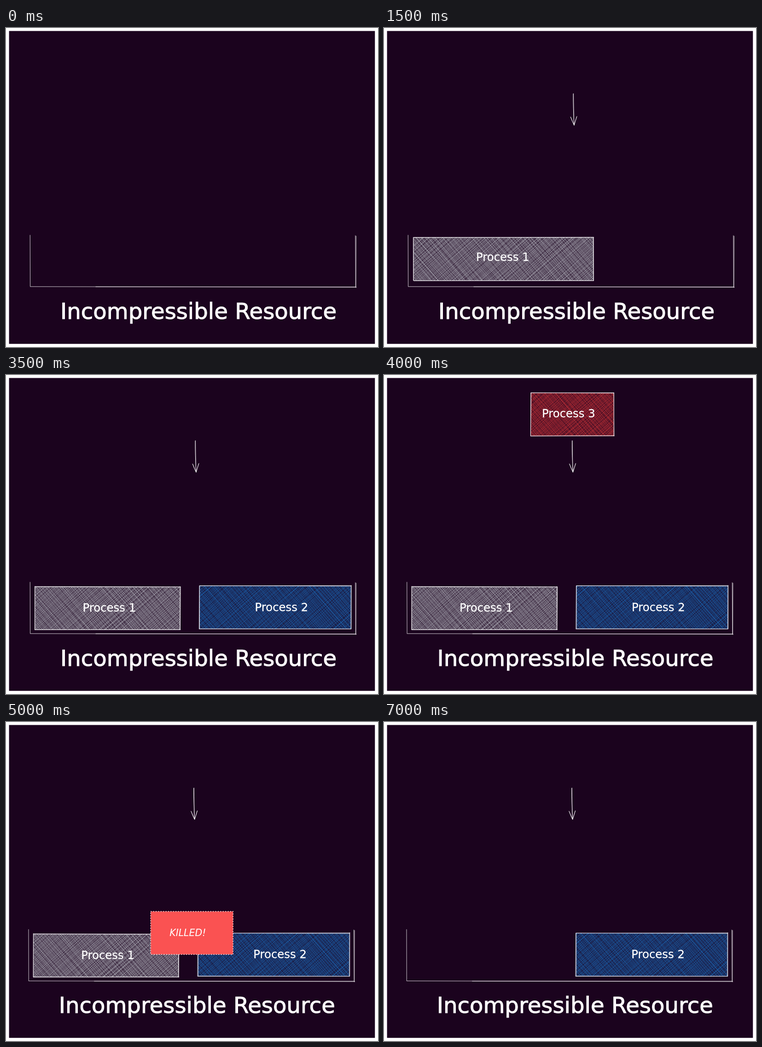
These frames come from a looping animation (808 by 693 pixels, 7.5 s). An HTML page:

```html
<!DOCTYPE html>
<html lang="en">
<head>
<meta charset="utf-8">
<title>Incompressible Resource</title>
<style>
  html, body { margin: 0; width: 100%; height: 100%; overflow: hidden; background: #fff; }
  svg { display: block; }
  text { font-family: "DejaVu Sans", sans-serif; font-size: 24.4px; fill: #fff; stroke: #fff; stroke-width: .3; }
  .title { font-size: 48.2px; stroke-width: 1; }
  .killed { font-size: 20.5px; font-style: italic; stroke: none; }
  .line { fill: none; stroke: #fff; stroke-width: 1; stroke-linecap: round; }
  .thin { stroke-width: .8; }
  .dotted { stroke-width: 1.4; stroke-dasharray: 2 3.4; stroke-linecap: butt; }
  .base { fill-opacity: .24; }
  .hatch { fill: none; stroke-width: .6; stroke-opacity: .62; }
</style>
</head>
<body>
<svg id="stage" width="808" height="693" viewBox="0 0 808 693">
  <rect x="6.6" y="6.5" width="794.7" height="679.7" fill="#1b031e"/>
  <g id="world">
    <path class="line thin" d="M52.3 450L52.6 561M52.6 561.8L761 563.2M195 562.2L760 562.4M758.8 451L759.4 562M760.4 452L760 564"/>
    <text class="title" x="118" y="631.5">Incompressible Resource</text>
    <path id="arrow" class="line thin" d="M411 143Q410.6 172 413 211M411.6 142.5Q412 180 412.6 210M405.4 193.5Q408.5 203 413 211M405.2 193Q410 203 412.6 210.5M419 192Q415.5 203 413 211M418.6 192.6Q416 201 412.8 211"/>
    <g id="scenes"></g>
  </g>
</svg>
<script>
const STEP = 500;
const NS = 'http://www.w3.org/2000/svg';
const world = document.getElementById('world');
const arrow = document.getElementById('arrow');
const GREY = '#ced4da', BLUE = '#1c7ed6', RED = '#f03e3e', ALERT = '#fa5252';

function add(parent, tag, attrs, text) {
  const node = document.createElementNS(NS, tag);
  for (const key in attrs) node.setAttribute(key, attrs[key]);
  if (text) node.textContent = text;
  return parent.appendChild(node);
}

function seeded(seed) {
  return () => {
    seed = (seed * 16807) % 2147483647;
    return seed / 2147483647 - 0.5;
  };
}

const segment = (...p) => {
  const [x1, y1, x2, y2] = p.map(v => v.toFixed(1));
  return `M${x1} ${y1}L${x2} ${y2}`;
};

// Two families of doubled, slightly uneven lines at right angles.
function crossHatch(w, h, random) {
  const angle = 41 * Math.PI / 180;
  const families = [
    { run: -h / Math.tan(angle), gap: 4 / Math.sin(angle) },
    { run: h * Math.tan(angle), gap: 4 / Math.cos(angle) }
  ];
  let d = '';
  for (const { run, gap } of families) {
    for (let x = -Math.abs(run); x < w + Math.abs(run); x += gap) {
      for (let pass = 0; pass < 2; pass++) {
        d += segment(x + random() * 7, 0, x + run + random() * 7, h);
      }
    }
  }
  return d;
}

function sketchRect(x, y, w, h, random) {
  const corners = [[x, y], [x + w, y], [x + w, y + h], [x, y + h]];
  const wobble = v => v + random() * 1.5;
  let d = '';
  for (let pass = 0; pass < 2; pass++) {
    corners.forEach((a, i) => {
      const b = corners[(i + 1) % 4];
      d += segment(...[...a, ...b].map(wobble));
    });
  }
  return d;
}

const HEIGHT = 93.5;

function process(number, color, x, y, right, textX, baseline) {
  return parent => {
    const w = right - x;
    const random = seeded(number * 7919 + Math.round(w) * 31);
    const clip = add(parent, 'svg', { x: x - .5, y: y - .5, width: w + 1, height: HEIGHT + 1 });
    add(clip, 'rect', { class: 'base', width: w + 1, height: HEIGHT + 1, fill: color });
    add(clip, 'path', { class: 'hatch', stroke: color, d: crossHatch(w + 1, HEIGHT + 1, random) });
    add(parent, 'path', { class: 'line thin', d: sketchRect(x, y, w, HEIGHT, random) });
    add(parent, 'text', { x: textX, y: baseline }, `Process ${number}`);
  };
}

function killed(x, y, right, textX, baseline) {
  return parent => {
    const box = { x, y, width: right - x, height: HEIGHT };
    add(parent, 'rect', { ...box, fill: ALERT });
    add(parent, 'rect', { ...box, class: 'line dotted' });
    add(parent, 'text', { class: 'killed', x: textX, y: baseline }, 'KILLED!');
  };
}

const first = (...box) => process(1, GREY, ...box);
const second = (...box) => process(2, BLUE, ...box);
const third = (...box) => process(3, RED, ...box);

const firstSmall = first(64, 455, 297, 129, 509);
const firstSettled = first(63, 460, 378.5, 166.5, 514);
const firstWide = first(63, 460, 521.5, 247.5, 514);
const secondSettled = second(420, 458, 749.7, 540.5, 512.5);

const scenes = [
  [],
  [first(301, 44, 473, 332, 97)],
  [first(64, 455, 236, 95, 508)],
  [first(64, 455, 455, 200, 505.5)],
  [firstSmall],
  [firstSmall, second(323.5, 39, 503, 354, 91)],
  [firstSmall, second(570.5, 458, 749.7, 602, 511)],
  [firstSettled, secondSettled],
  [firstSettled, secondSettled, third(321.5, 39, 502, 345.5, 92)],
  [firstSettled, secondSettled, third(317.5, 410.5, 496.5, 341.5, 464)],
  [firstSettled, secondSettled, killed(317.5, 410.8, 496.5, 358.5, 464.5)],
  [firstSettled, secondSettled],
  [firstWide, secondSettled],
  [secondSettled, killed(63, 460, 521.5, 245, 513.5)],
  [secondSettled]
];

const layers = scenes.map(boxes => {
  const layer = add(document.getElementById('scenes'), 'g', { display: 'none' });
  boxes.forEach(draw => draw(layer));
  return layer;
});

let shown = -1;
function render(time) {
  const index = Math.floor(time / STEP) % scenes.length;
  if (index !== shown) {
    layers.forEach((layer, i) => layer.setAttribute('display', i === index ? 'inline' : 'none'));
    arrow.setAttribute('display', index ? 'inline' : 'none');
    // The whole drawing jumps slightly twice per loop.
    const [dx, dy] = index < 8 ? [0, 0] : index < 10 ? [-2.5, 0] : [-3.3, 0.7];
    world.setAttribute('transform', `translate(${dx} ${dy})`);
    shown = index;
  }
}

const start = performance.now();
function tick() {
  render(performance.now() - start);
  requestAnimationFrame(tick);
}
tick();
</script>
</body>
</html>
```
